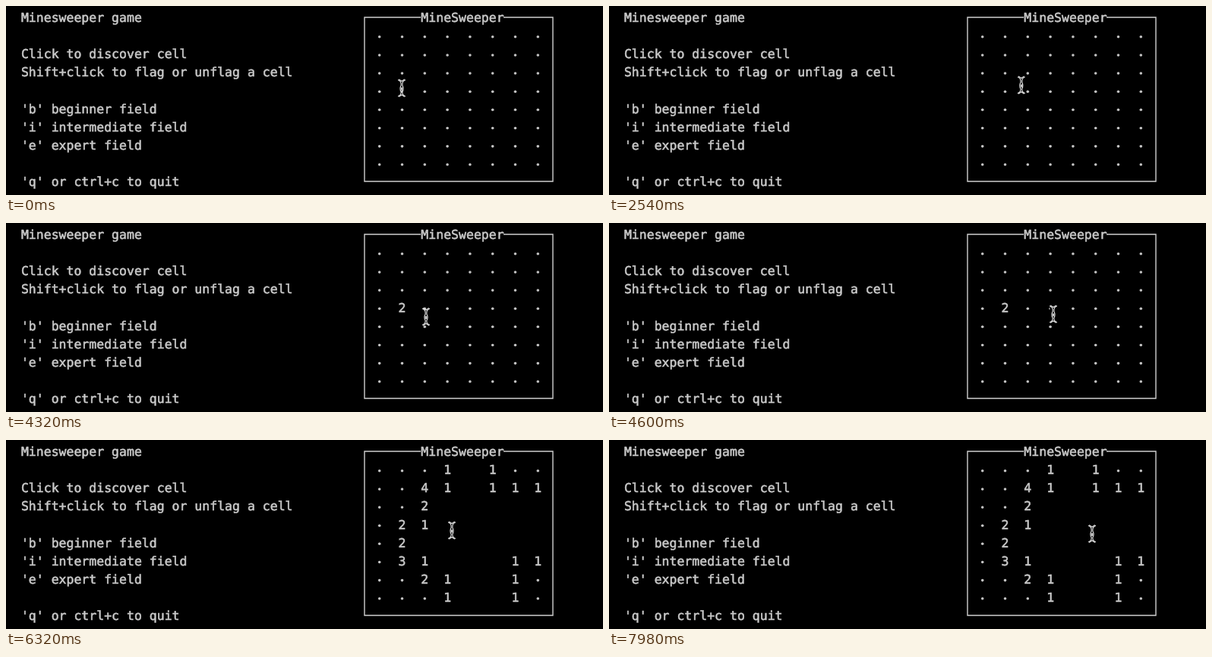
These frames come from a looping animation (786x250 px, 8 s). An HTML page:

```html
<!DOCTYPE html>
<html lang="en">
<head>
<meta charset="utf-8">
<title>Minesweeper game</title>
<style>
  html, body { margin: 0; width: 100%; height: 100%; overflow: hidden; background: #000; }
  svg { display: block; }
  text {
    font: 16.5px "DejaVu Sans Mono", monospace;
    fill: #c8c8c8; stroke: #c8c8c8; stroke-width: .6;
    white-space: pre; text-rendering: geometricPrecision;
  }
  .dot { fill: #c4c4c4; }
  .frame { fill: none; stroke: #cfcfcf; stroke-width: 1.4; }
  #cursor path { fill: #000; stroke: #e4e4e4; stroke-width: 1.15; stroke-linecap: round; }
</style>
</head>
<body>
<svg width="786" height="250" viewBox="0 0 786 250">
  <path class="frame" d="M546 15H472V232H720V15H655"/>
  <g id="help"></g>
  <g id="board"></g>
  <g id="cursor">
    <g id="side">
      <path d="M-4.5 -10.6Q-.9 -9.2 -.9 -5.5V-3.5Q-3.2 .8 -.9 5V6Q-.9 9.4 -4.5 10.8"/>
      <path d="M-3.4 -11.4L0 -9M-3.4 11.4L0 9M-.7 -.5V2.5"/>
    </g>
    <use href="#side" transform="scale(-1 1)"/>
  </g>
</svg>
<script>
const LOOP = 8000, CHAR = 9.933, LINE = 24.13, LEFT = 19.9, BASE = 21;
const $ = id => document.getElementById(id);

function add(parent, tag, attrs, content = '') {
  const el = document.createElementNS('http://www.w3.org/2000/svg', tag);
  for (const name in attrs) el.setAttribute(name, attrs[name]);
  el.textContent = content;
  return parent.appendChild(el);
}

const write = (parent, col, row, content) =>
  add(parent, 'text', { x: LEFT + col * CHAR, y: BASE + row * LINE }, content);

const help = `Minesweeper game

Click to discover cell
Shift+click to flag or unflag a cell

'b' beginner field
'i' intermediate field
'e' expert field

'q' or ctrl+c to quit`;
help.split('\n').forEach((line, row) => write($('help'), 0, row, line));
write($('help'), 53, 0, 'MineSweeper');

const hidden = Array(8).fill('........');
const boards = [
  { at: 0, rows: hidden },
  { at: 4080, rows: hidden.map((row, i) => i === 3 ? '.2......' : row) },
  { at: 6320, rows: [
    '...1 1..',
    '..41 111',
    '..2     ',
    '.21     ',
    '.2      ',
    '.31   11',
    '..21  1.',
    '...1  1.'] }
];

for (const board of boards) {
  board.group = add($('board'), 'g', {});
  board.rows.forEach((row, y) => [...row].forEach((cell, x) => {
    if (cell === '.') {
      add(board.group, 'circle', {
        class: 'dot', r: 1.8, cx: LEFT + (47.5 + 3 * x) * CHAR, cy: 40.8 + y * LINE
      });
    } else if (cell !== ' ') write(board.group, 47 + 3 * x, y + 1, cell);
  }));
}

// Pointer moves: start and end time, number of steps, destination
const start = [521, 108.5];
const moves = [
  [1840, 2080, 5, 543, 104.5],
  [2500, 2820, 8, 521, 114.5],
  [3500, 3500, 1, 521, 118],
  [3620, 3620, 1, 521, 127.5],
  [4080, 4600, 10, 585, 120.5],
  [5460, 5600, 3, 587, 119.5],
  [6840, 7140, 8, 618, 124],
  [7840, 7980, 4, 636, 124]
];
const ease = p => p < .5 ? 4 * p ** 3 : 1 - 4 * (1 - p) ** 3;

function pointerAt(t) {
  let [x, y] = start;
  for (const [from, to, steps, endX, endY] of moves) {
    if (t < from) break;
    const done = t >= to ? steps : 1 + Math.floor((t - from) / (to - from) * (steps - 1));
    const p = ease(done / steps);
    x += (endX - x) * p;
    y += (endY - y) * p;
  }
  return [x, y];
}

function draw() {
  const t = performance.now() % LOOP;
  const current = boards.findLast(board => t >= board.at);
  for (const board of boards) {
    board.group.style.display = board === current ? '' : 'none';
  }
  $('cursor').setAttribute('transform', `translate(${pointerAt(t)})`);
  requestAnimationFrame(draw);
}
draw();
</script>
</body>
</html>
```
